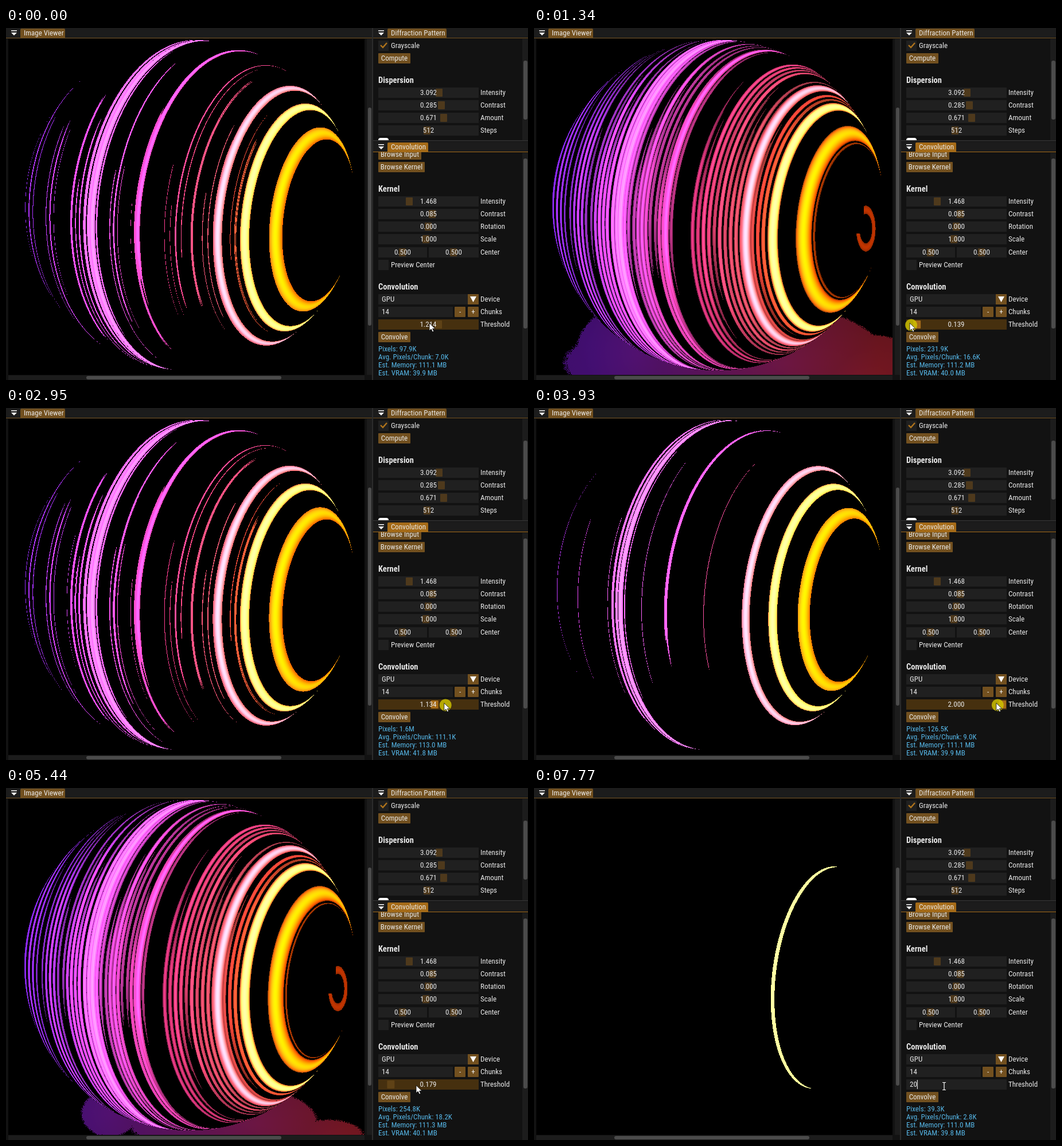
Animation, 910 px wide and 615 px high, one loop 8330 ms. Source, as an HTML page with a canvas:

```html
<!DOCTYPE html>
<html lang="en">
<head>
<meta charset="utf-8">
<title>Threshold slider</title>
<style>
html, body { margin: 0; width: 100%; height: 100%; overflow: hidden; background: #121212; }
canvas { position: absolute; left: 4px; top: 19px; }
svg { position: absolute; left: 0; top: 0; }
text { font: 13px "Roboto Condensed", Roboto, sans-serif; font-stretch: 75%; fill: #e8e8e8; white-space: pre; }
text.bold { font-weight: 700; font-size: 14.5px; }
text.stat { fill: #56b7e8; }
</style>
</head>
<body>
<canvas id="view" width="621" height="587"></canvas>
<svg id="ui" width="910" height="615" viewBox="0 0 910 615"></svg>
<script>
const LOOP = 8330, W = 621, H = 587, LEFT = 4, TOP = 19;
const clamp = (v, a, b) => Math.max(a, Math.min(b, v));
const noise = n => Math.abs(Math.sin(n * 12.9898) * 43758.5453) % 1;

// ---------- banded sphere with HDR intensity ----------
const CX = 320, CY = 309, R = 289, DIST = 4, TILT = 0.117, PHI = 0.925;
const ZOOM = Math.sqrt(DIST * DIST - 1);
const axis = [Math.sin(PHI) * Math.cos(TILT), Math.sin(PHI) * Math.sin(TILT), Math.cos(PHI)];
const side = [-Math.cos(PHI) * Math.cos(TILT), -Math.cos(PHI) * Math.sin(TILT), Math.sin(PHI)];
const dot = (a, b) => a[0] * b[0] + a[1] * b[1] + a[2] * b[2];

// bright rings: u is where the ring crosses the middle row
const bands = [
  { u: 152, w: 7, amp: 8 }, { u: 232, w: 6, amp: 5, mid: 160, reach: 230 },
  { u: 372, w: 10, amp: 13 }, { u: 419, w: 10, amp: 28 },
  { u: 473, w: 16, amp: 11 }, { u: 491, w: 4, amp: .4 }
];
function stripe(u, amp) {
  bands.push({ u, amp, w: Math.min(4.8, 2 + u / 60), mid: 320 + 300 * (noise(u) - .5), reach: 100 + 40 * amp });
}
// six loose groups on the left, then an even comb up to the bright rings
for (let k = 0; k < 6; k++)
  for (let j = -2; j <= 2; j++) {
    const u = 40 + 37.5 * k + 7 * j;
    stripe(u, 2.3 - .8 * Math.abs(j) + 4.5 * Math.exp(-(((u - 143) / 14) ** 2)));
  }
for (let u = 279; u < 408; u += 9.5) stripe(u, .9 + 1.6 * noise(u + 4));

// position, then red, green, blue
const hues = [
  [31, .55, .16, 1], [150, 1, .33, 1], [285, .92, .22, .5],
  [372, 1, .37, .42], [396, 1, .28, .2], [419, 1, .5, .21], [473, 1, .42, 0], [500, 1, .27, 0]
];
function hue(u) {
  const i = clamp(hues.findIndex(h => h[0] > u), 1, hues.length - 1);
  const a = hues[i - 1], b = u > 500 ? a : hues[i], k = clamp((u - a[0]) / (hues[i][0] - a[0]), 0, 1);
  return u > 500 ? hues[hues.length - 1].slice(1) : [1, 2, 3].map(c => a[c] + (b[c] - a[c]) * k);
}

function hit(px, py) {
  const dx = px / ZOOM, dy = py / ZOOM, q = 1 + dx * dx + dy * dy;
  const t = (DIST - Math.sqrt(Math.max(0, DIST * DIST - q * ZOOM * ZOOM))) / q;
  return [dx * t, dy * t, DIST - t];
}

function sphere(x, y) {
  const n = hit((x - CX) / R, (y - CY) / R);
  const theta = Math.acos(clamp(dot(axis, n), -1, 1)), a = PHI - theta;
  const u = CX + R * Math.sin(a) * ZOOM / (DIST - Math.cos(a));
  const lon = dot(side, n) / Math.max(.01, Math.sin(theta));
  const groove = .8 + .2 * Math.sin(u * 1.9);
  let v = .02;
  for (const { u: c, w, amp, mid = CY, reach = R } of bands) {
    const d = (u - c) / w;
    if (Math.abs(d) >= 1) continue;
    const far = Math.max(0, Math.abs(y - mid) - reach);
    const s = amp * (1 - d * d) ** 3 * Math.exp(-far / 70) * (.66 + .34 * lon);
    v = Math.max(v, amp < 10 ? s * groove : s);
  }
  // hook at the pole
  const e = (Math.hypot((x - 578) / 17, (y - 350) / 40) - .82) / .22;
  if (Math.abs(e) < 1 && (x > 574 || y > 358)) v = Math.max(v, .45 * (1 - e * e));
  return [v, hue(u)];
}

function floor(x, y) {
  const dx = x - 440;
  const v = Math.max(
    .212 - .00068 * Math.hypot(x - 180, (y - 568) * 1.2),
    .235 - .00055 * Math.hypot(dx < 0 ? dx * .45 : dx, (y - 585) * 1.8),
    .206 - .00044 * Math.hypot(x - 562, (y - 610) * 2),
    .01 + y / 15000);
  const k = clamp((x - 100) / 500, 0, 1);
  return [v + .003 * (noise(x + y * 6.02) - .5), [.5 + .3 * k, .11 + .05 * k, .85 - .62 * k]];
}

const ctx = document.getElementById("view").getContext("2d");
const img = ctx.createImageData(W, H);
const out = new Uint32Array(img.data.buffer);
const level = new Float32Array(W * H), color = new Uint32Array(W * H);
for (let i = 0; i < W * H; i++) {
  const x = LEFT + i % W, y = TOP + Math.floor(i / W);
  const [v, base] = Math.hypot(x - CX, y - CY) < R ? sphere(x, y) : floor(x, y);
  const [r, g, b] = base.map(c => Math.round(255 * Math.min(1, c * v ** .35)));
  level[i] = v;
  color[i] = (0xff000000 | b << 16 | g << 8 | r) >>> 0;
}
let lastCut = -1;
function showImage(cut) {
  if (cut === lastCut) return;
  lastCut = cut;
  for (let i = 0; i < out.length; i++) out[i] = level[i] > cut ? color[i] : 0xff000000;
  ctx.putImageData(img, 0, 0);
}

// ---------- interface ----------
const ui = document.getElementById("ui");
function add(tag, attrs, text) {
  const el = document.createElementNS("http://www.w3.org/2000/svg", tag);
  for (const k in attrs) el.setAttribute(k, attrs[k]);
  if (text !== undefined) el.textContent = text;
  return ui.appendChild(el);
}
const rect = (x, y, width, height, fill, rx = 0) => add("rect", { x, y, width, height, fill, rx });
const label = (x, y, s, more) => add("text", { x, y: y + 4, ...more }, s);
const centered = (x, y, s) => label(x, y, s, { "text-anchor": "middle" });
const heading = (y, s) => label(649, y, s, { class: "bold" });
const path = (d, more) => add("path", { d, ...more });
const PANEL = "#121212", DARK = "#1c1c1c", FRAME = "#202020", GREY = "#4b4b4b";
const BROWN = "#72501f", KNOB = "#4e391c", HOVER = "#46300f", LIT = "#a56b18", ROW = 22.15;

function button(x, y, w, s) {
  rect(x, y - 9, w, 18, BROWN, 1);
  centered(x + w / 2, y, s);
}
function slider(y, name, text, knob, x = 649, w = 175) {
  rect(x, Math.round(y) - 9, w, 18, FRAME);
  rect(knob - 6, Math.round(y) - 7, 12, 14, KNOB, 1);
  centered(x + w / 2, y, text);
  label(827, y, name);
}
function tab(x, w, y, s, fill, end) {
  const left = x - 25;
  rect(left, y - 9, end - left, 18, DARK);
  path(`M${x} ${y + 9}v-15q0-2 2-2h${w - 4}q2 0 2 2v15z`, { fill });
  rect(left, y + 8, end - left, 1, fill);
  rect(x - 16, y - 5, 10, 1.5, "#fff");
  path(`M${x - 16} ${y - 1}h10l-5 5z`, { fill: "#fff" });
  label(x + 6, y, s);
}
function scrollbar(x, y, w, h, from, size) {
  rect(x, y, w, h, DARK);
  if (h > w) rect(x + 2, from, w - 3, size, GREY, 3);
  else rect(from, y + 1, size, h - 2, GREY, 3);
}

rect(640, 0, 270, 615, PANEL);
scrollbar(629, 19, 9, 587, 139, 381);
scrollbar(4, 607, 621, 8, 140, 340);
scrollbar(900, 19, 10, 178, 57, 103);
scrollbar(900, 218, 10, 397, 228, 297);
rect(638, 0, 2, 615, "#2c2c2c");

tab(25, 78, 9, "Image Viewer", BROWN, 638);
tab(665, 103, 9, "Diffraction Pattern", BROWN, 910);
rect(649, 22, 18, 18, FRAME);
path("M653 30l4 4 7-8", { fill: "none", stroke: "#b0741b", "stroke-width": 2.4 });
label(671, 31, "Grayscale");
button(649, 53, 56, "Compute");
heading(92, "Dispersion");
[["Intensity", "3.092", 755], ["Contrast", "0.285", 759], ["Amount", "0.671", 763], ["Steps", "512", 734]]
  .forEach((s, i) => slider(113 + ROW * i, ...s));
path("M649 196q0-4 4-4h10q4 0 4 4z", { fill: "#fff" });

button(649, 221, 75, "Browse Input");
rect(640, 196, 270, 2, "#2c2c2c");
tab(665, 71, 208, "Convolution", LIT, 910);
button(649, 243, 81, "Browse Kernel");
heading(282, "Kernel");
[["Intensity", "1.468", 703], ["Contrast", "0.085", 743], ["Rotation", "0.000", 736], ["Scale", "1.000", 732]]
  .forEach((s, i) => slider(303 + ROW * i, ...s));
slider(392, "", "0.500", 691, 649, 85);
slider(392, "Center", "0.500", 780, 737, 87);
rect(649, 405, 18, 18, FRAME);
label(671, 414, "Preview Center");
heading(453, "Convolution");
rect(649, 465, 156, 18, FRAME);
rect(805, 465, 19, 18, BROWN);
path("M809 469h11l-5.5 10z", { fill: "#fff" });
label(655, 474, "GPU");
rect(649, 487, 130, 18, FRAME);
label(655, 496, "14");
button(782, 496, 19, "-");
button(805, 496, 19, "+");

const track = rect(649, 509, 175, 18, HOVER);
const knob = rect(0, 511, 13, 14, KNOB, 1);
const mark = rect(655, 510, 28, 16, "#7a5316");
const value = centered(736, 518, "");
const typed = label(655, 518, "");
const caret = rect(0, 510, 1, 16, "#fff");
["Device", "Chunks", "Threshold"].forEach((s, i) => label(827, 474 + 22 * i, s));
button(649, 540, 56, "Convolve");
const lines = [0, 1, 2, 3].map(i => label(649, 560.5 + 14.2 * i, "", { class: "stat" }));

const press = add("circle", { r: 10.5, fill: "#d2c800", "fill-opacity": .8 });
const arrow = path("M0 0V13.5L3.2 10.6L5.5 15.5L7.8 14.5L5.6 9.8H10Z",
  { fill: "#fff", stroke: "#000", "stroke-width": .8 });
const beam = path("M-3 -6.5h2.3l.7.7.7-.7h2.3M0 -6v12M-3 6.5h2.3l.7-.7.7.7h2.3",
  { fill: "none", stroke: "#fff", "stroke-width": 1.2 });

// ---------- timeline ----------
const START = 140, RELEASE = 5280, EDIT = 5640, LAG = 110, STEP = 2 / 201;
// time and pointer x: left, right, left again, then a little right
const moves = [
  [160, 738], [1230, 667.6], [1340, 655], [1700, 655], [2160, 672.5], [2840, 747.3],
  [3600, 860], [3720, 860], [4460, 670], [4570, 659], [4830, 655], [5170, 671], [5440, 715]
];
const counts = [[0, 97.9], [880, 231.9], [1900, 1555], [3000, 126.5], [5000, 254.8], [7690, 39.3]];
const entries = [[EDIT, "0.179"], [6560, "1"], [7330, ""], [7610, "2"], [7690, "20"]];
const latest = (list, t) => list.filter(e => e[0] <= t).pop()[1];

function mouseX(t) {
  const i = moves.findIndex(m => m[0] > t);
  if (i < 1) return moves[i < 0 ? moves.length - 1 : 0][1];
  const [t0, a] = moves[i - 1], [t1, b] = moves[i];
  return a + (b - a) * (t - t0) / (t1 - t0);
}
function threshold(t) {
  if (t < START) return 122 * STEP;
  if (t >= 6560) return +latest(entries.filter(e => e[1]), t);
  const x = mouseX(Math.min(t, RELEASE) - LAG);
  return Math.round(clamp((x - 656.5) / 80, 0, 2) / STEP) * STEP;
}
function stats(t) {
  const kilo = latest(counts, t), mem = 110.94 + kilo * .00132;
  return [
    "Pixels: " + (kilo < 1000 ? kilo + "K" : (kilo / 1000).toFixed(1) + "M"),
    `Avg. Pixels/Chunk: ${(kilo / 14).toFixed(1)}K`,
    `Est. Memory: ${mem.toFixed(1)} MB`,
    `Est. VRAM: ${(mem - 71.2).toFixed(1)} MB`
  ];
}
const show = (el, on) => el.setAttribute("visibility", on ? "visible" : "hidden");
const write = (el, s) => { if (el.textContent !== s) el.textContent = s; };

function draw(t) {
  const cut = threshold(t), x = mouseX(t), drag = t >= START && t < RELEASE, edit = t >= EDIT;
  const y = 517 - 5 * Math.max(0, 1 - Math.abs(t - 4600) / 500) + (t > RELEASE ? 4 : 0);
  showImage(cut);

  track.setAttribute("fill", edit ? FRAME : HOVER);
  knob.setAttribute("x", 650 + 80 * clamp(cut, 0, 2));
  knob.setAttribute("fill", drag ? LIT : "#5f4216");
  write(value, cut.toFixed(3));
  write(typed, edit ? latest(entries, t) : "");
  show(knob, !edit);
  show(value, !edit);
  show(mark, edit && t < 6560);
  show(caret, t >= 6560);
  caret.setAttribute("x", 655 + (typed.textContent ? typed.getComputedTextLength() : 0));
  stats(t).forEach((s, i) => write(lines[i], s));

  show(press, drag);
  press.setAttribute("cx", x + 2.5);
  press.setAttribute("cy", y + 2);
  show(arrow, !edit);
  arrow.setAttribute("transform", `translate(${x} ${y - 1.5})`);
  show(beam, edit);
  beam.setAttribute("transform", `translate(${x} 521)`);
}

const begin = performance.now();
function tick() {
  draw((performance.now() - begin) % LOOP);
  requestAnimationFrame(tick);
}
tick();
</script>
</body>
</html>
```
